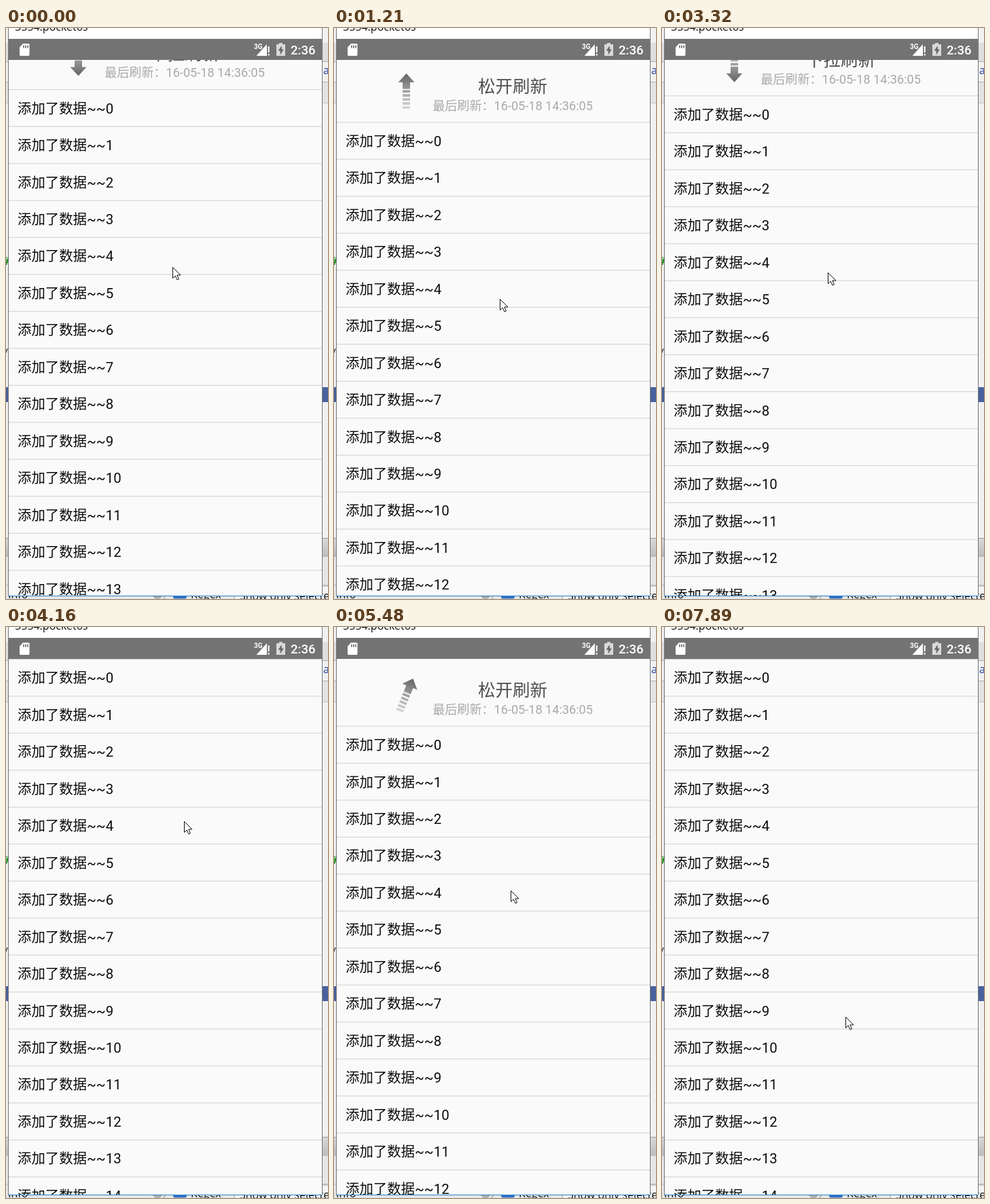
An HTML page for the animation above (8000 ms loop, 474 by 841 pixels).

```html
<!DOCTYPE html>
<html lang="zh">
<head>
<meta charset="utf-8">
<title>Pull to refresh</title>
<style>
  html, body { margin: 0; width: 100%; height: 100%; overflow: hidden; background: #fff; }
  svg { display: block; width: 474px; height: 841px; font-family: Roboto, 'Noto Sans CJK SC', 'Noto Sans CJK', sans-serif; }
  .ide { font-family: 'Open Sans', 'Noto Sans', sans-serif; font-size: 16px; fill: #111; }
  .row { font-size: 20.4px; fill: #0c0c0c; }
</style>
</head>
<body>
<svg viewBox="0 0 474 841">
  <defs>
    <clipPath id="screen"><rect x="4" y="47" width="461.5" height="789"/></clipPath>
    <linearGradient id="fade" gradientUnits="userSpaceOnUse" x1="0" y1="-26" x2="0" y2="26">
      <stop offset="0" stop-color="#d8d8d8"/><stop offset=".5" stop-color="#a0a0a0"/><stop offset="1" stop-color="#626262"/>
    </linearGradient>
    <linearGradient id="bar" x1="0" y1="0" x2="0" y2="1">
      <stop offset="0" stop-color="#d9d9d9"/><stop offset="1" stop-color="#bcbcbc"/>
    </linearGradient>
  </defs>

  <!-- editor behind the phone window -->
  <rect width="474" height="841" fill="#f1f1f1"/>
  <rect y="22" width="474" height="28" fill="#dedede"/>
  <rect y="49" width="474" height="1" fill="#b0b0b0"/>
  <rect y="79" width="474" height="1" fill="#b0b0b0"/>
  <rect y="80" width="474" height="30" fill="#e3e3e3"/>
  <rect y="110" width="474" height="1" fill="#c4c4c4"/>
  <rect y="529" width="474" height="22" fill="#4a629c"/>
  <rect y="751" width="474" height="28" fill="url(#bar)"/>
  <rect y="751" width="474" height="1" fill="#999"/>
  <rect y="779" width="474" height="62" fill="#e6e6e6"/>
  <rect y="820" width="474" height="1" fill="#b5b5b5"/>
  <g class="ide">
    <text x="467" y="68" fill="#2b3fa0" style="fill:#2b3fa0">a</text>
    <text x="-5" y="349" style="fill:#148a14;font-weight:bold;font-style:italic">#</text>
    <text x="-3" y="484" style="fill:#223">/</text>
    <text x="3" y="840">Info</text>
    <circle cx="223" cy="833" r="8" fill="#aaa"/>
    <path d="M232 841l5-9" stroke="#888"/>
    <rect x="246" y="822" width="20" height="18.5" rx="3" fill="#2f6fc4"/>
    <text x="272" y="840">Regex</text>
    <rect x="336.5" y="822" width="140" height="22" fill="#f4f4f4" stroke="#aaa"/>
    <text x="344" y="842">Show only selected</text>
  </g>

  <!-- phone window -->
  <rect x="3" width="463" height="837" fill="#fff"/>
  <text class="ide" x="13" y="4">5554:pocket6s</text>
  <rect x="4" y="47" width="461.5" height="789" fill="#fafafa"/>
  <g clip-path="url(#screen)">
    <g id="list">
      <g id="header" text-anchor="middle">
        <g id="arrow">
          <path id="arrowShape" fill="url(#fade)"/>
        </g>
        <g id="spinner" fill="none" stroke="#a6a6a6" stroke-width="4.6">
          <path d="M-14.5-2.5A14.7 14.7 0 0 1 11-10"/>
          <path d="M14.5 2.5A14.7 14.7 0 0 1-11 10"/>
          <path d="M18-15.5V-3H5.5zM-18 15.5V3H-5.5z" fill="#a6a6a6" stroke="none"/>
        </g>
        <text id="title" x="263" y="-44" font-size="25.5" fill="#505050"></text>
        <text x="263" y="-18.3" font-size="18.1" fill="#a9a9a9">最后刷新：16-05-18 14:36:05</text>
      </g>
    </g>
  </g>
  <rect x="4" y="16" width="461.5" height="31" fill="#737373"/>
  <g fill="#fff">
    <path fill-rule="evenodd" d="M25 23h8q1.500 0 1.500 1.500v15q0 1.500-1.500 1.500h-11.500q-1.500 0-1.500-1.500v-11zM25 25.500v4h1.700v-4zM28 25.500v4h1.700v-4zM31 25.500v4h1.700v-4z"/>
    <text x="365" y="31" font-size="10" font-weight="700">3G</text>
    <path d="M384 24v17h-15.500z"/>
    <path d="M385.700 27h2v9h-2zM385.700 38h2v2.500h-2z"/>
    <path d="M402 22h5v2h4v17h-13v-17h4z" fill="#d9d9d9"/>
    <path d="M405.800 26v5.500h3l-5 8v-6h-3.200z" fill="#666"/>
    <text x="419" y="38.500" font-size="18.600" font-weight="500">2:36</text>
  </g>
  <path d="M3.500 0V836M465.500 0V836" stroke="#6d7780"/>
  <path d="M3 836.500H466" stroke="#2a86cc"/>
  <path id="cursor" d="M.5.5V16.500L4.200 13 7 19l2.500-1.100L6.800 12H12z" fill="#fff" stroke="#111"/>
</svg>

<script>
const LOOP = 8000, ROW = 54.46, TOP = 47.4;
const $ = id => document.getElementById(id);
const clamp = p => Math.min(1, Math.max(0, p));
const linear = p => p;
const smooth = p => p * p * (3 - 2 * p);
const easeOut = p => 1 - (1 - p) ** 2.5;

// Moments at which the picture updates: [first, last, count]
const ticks = [[0, 0, 1], [120, 1090, 8], [1210, 1210, 1], [1640, 2340, 6], [3050, 4010, 8],
  [4160, 5090, 8], [5240, 5600, 4], [6380, 7370, 8], [7770, 7890, 2]]
  .flatMap(([a, b, n]) => Array.from({ length: n }, (_, i) => a + (n > 1 ? (b - a) * i / (n - 1) : 0)));

// [time, list offset, cursor x, cursor y, easing into this key]
const keys = [
  [0, 43.2, 245, 352],
  [1210, 91.5, 244, 399, easeOut],
  [1500, 91.5, 244, 399, linear],
  [1920, 78, 239, 385, smooth],
  [2913, 78, 239, 385, linear],
  [3750, 0, 255, 308, linear],
  [4160, 0, 262, 286, easeOut],
  [4957, 75, 261, 364, linear],
  [5090, 86, 261, 375, linear],
  [5600, 99, 260, 388, easeOut],
  [6379, 99, 260, 388, linear],
  [6380, 84.5, 260, 388, linear],
  [7369, 84.5, 260, 388, linear],
  [7370, 0, 260, 388, linear],
  [7650, 0, 260, 388, linear],
  [7890, 0, 270, 574, linear],
];

// [start, title, arrow angle before, arrow angle after]
const states = [
  [0, '下拉刷新', 0, 0],
  [674, '松开刷新', 0, -180],
  [1780, '下拉刷新', -180, -360],
  [5090, '松开刷新', 0, -180],
  [6380, '正在刷新...', 0, 0],
];

function pose(t) {
  const next = keys.findIndex(k => k[0] > t);
  if (next < 0) return keys[keys.length - 1].slice(1, 4);
  const a = keys[next - 1], b = keys[next];
  const p = b[4]((t - a[0]) / (b[0] - a[0]));
  return [1, 2, 3].map(i => a[i] + (b[i] - a[i]) * p);
}

function build() {
  let shape = 'M-5.500 3.200H5.500V13H12L0 26L-12 13H-5.500z';
  for (let y = -26; y < 2; y += 5.9) shape += `M-5.500 ${y}h11v3.700h-11z`;
  $('arrowShape').setAttribute('d', shape);
  let rows = '';
  for (let i = 0; i < 16; i++) {
    const y = i * ROW;
    rows += `<rect x="4" y="${y - 0.6}" width="462" height="1.300" fill="#d9d9d9"/>` +
      `<text class="row" x="17" y="${y + 35}">添加了数据~~${i}</text>`;
  }
  $('list').insertAdjacentHTML('beforeend', rows);
}

function draw(time) {
  const t = ticks.filter(tick => tick <= time + 0.5).pop();
  const [offset, x, y] = pose(t);
  const [start, title, from, to] = states.filter(s => s[0] <= t + 0.5).pop();
  const refreshing = start === 6380;
  const angle = from + (to - from) * smooth(clamp((t - start) / 500));
  $('list').setAttribute('transform', `translate(0 ${TOP + offset})`);
  $('cursor').setAttribute('transform', `translate(${Math.round(x)} ${Math.round(y)})`);
  $('title').textContent = title;
  $('header').style.display = offset > 0 ? '' : 'none';
  $('arrow').style.display = refreshing ? 'none' : '';
  $('spinner').style.display = refreshing ? '' : 'none';
  $('arrow').setAttribute('transform', `translate(106.500 -46) rotate(${angle})`);
  $('spinner').setAttribute('transform', `translate(106 -46) rotate(${(t - 6380) * 360 / 750})`);
}

build();
const begin = performance.now();
function frame() {
  draw((performance.now() - begin) % LOOP);
  requestAnimationFrame(frame);
}
frame();
</script>
</body>
</html>
```
